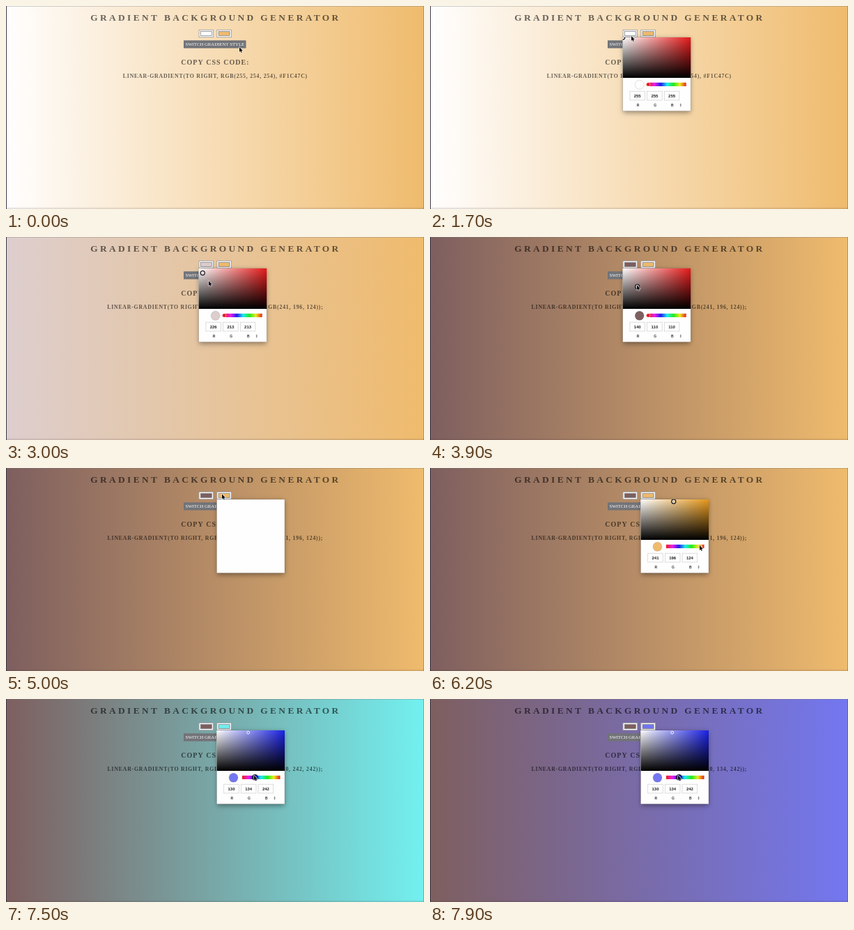
Write an HTML page with a canvas that moves like this. It is 600 px wide and 291 px high and loops after 8 s.

```html
<!DOCTYPE html>
<html lang="en">
<head>
<meta charset="utf-8">
<title>Gradient Background Generator</title>
<style>
  html, body { margin: 0; width: 100%; height: 100%; overflow: hidden; background: #fff; }
  canvas { display: block; width: 600px; height: 291px; }
</style>
</head>
<body>
<canvas id="stage" width="600" height="291"></canvas>
<script>
const ctx = document.getElementById('stage').getContext('2d');
const LOOP = 8000, STEP = 100;
const SERIF = '"Liberation Serif", "Times New Roman", serif';
const SANS = '"Liberation Sans", Arial, sans-serif';

// Each key: time, then values. Eased between keys.
const CURSOR = [
  [0, 335, 59], [500, 335, 59], [1300, 289, 43], [1800, 289, 43], [2200, 278, 46],
  [2500, 281, 50], [3000, 291, 63], [3500, 297, 69], [4000, 297, 69], [4700, 310, 37.5],
  [5300, 310, 37.5], [6100, 387, 111], [6500, 387, 111], [7000, 365, 111], [7300, 356, 109.5]
];
const SHADE = [
  [2300, 0, 1], [2700, 0.0575, 0.886], [3000, 0.0575, 0.886], [3600, 0.2143, 0.549]
];
const HUE = [[6300, 38], [6800, 52], [7000, 80.9], [7200, 160], [7500, 237.9]];

function track(keys, t) {
  if (t <= keys[0][0]) return keys[0].slice(1);
  for (let i = 1; i < keys.length; i++) {
    const a = keys[i - 1], b = keys[i];
    if (t < b[0]) {
      const p = (t - a[0]) / (b[0] - a[0]);
      const e = p * p * (3 - 2 * p);
      return a.slice(1).map((v, k) => v + (b[k + 1] - v) * e);
    }
  }
  return keys[keys.length - 1].slice(1);
}

function hsv(h, s, v) {
  const ch = n => {
    const k = (n + h / 60) % 6;
    return Math.round(255 * v * (1 - s * Math.max(0, Math.min(k, 4 - k, 1))));
  };
  return [ch(5), ch(3), ch(1)];
}

// Screen tone of a nominal colour
const tone = c => 'rgb(' + c.map(v => Math.round(255 * Math.pow(v / 255, 1.18))) + ')';
const css = c => 'RGB(' + c.join(', ') + ')';

function rect(x, y, w, h, fill) {
  ctx.fillStyle = fill;
  ctx.fillRect(x, y, w, h);
}

function frame(x, y, w, h, stroke, width) {
  ctx.strokeStyle = stroke;
  ctx.lineWidth = width;
  ctx.strokeRect(x, y, w, h);
}

function text(str, x, y, font, fill, gap = 0) {
  ctx.font = font;
  ctx.letterSpacing = gap + 'px';
  ctx.textAlign = 'center';
  ctx.fillStyle = fill;
  ctx.fillText(str, x, y);
  ctx.letterSpacing = '0px';
}

function dot(x, y, r, fill, stroke, width) {
  ctx.beginPath();
  ctx.arc(x, y, r, 0, 2 * Math.PI);
  if (fill) { ctx.fillStyle = fill; ctx.fill(); }
  if (stroke) { ctx.strokeStyle = stroke; ctx.lineWidth = width; ctx.stroke(); }
}

function blend(x0, y0, x1, y1, ...stops) {
  const g = ctx.createLinearGradient(x0, y0, x1, y1);
  stops.forEach((c, i) => g.addColorStop(i / (stops.length - 1), c));
  return g;
}

function colorInput(x, color) {
  rect(x, 34, 21, 11, '#fdfdfd');
  frame(x + 0.25, 34.25, 20.5, 10.5, '#85858a', 0.7);
  rect(x + 2.5, 36.5, 16, 6, color);
  frame(x + 2.5, 36.5, 16, 6, '#77777c', 0.7);
}

function picker(x, p) {
  const y = 45, w = 97.5, h = 58;
  ctx.save();
  ctx.shadowColor = 'rgba(0,0,0,.4)';
  ctx.shadowBlur = 7;
  ctx.shadowOffsetY = 2;
  rect(x, y, w, 105.5, '#fefefe');
  ctx.restore();
  frame(x, y, w, 105.5, 'rgba(90,80,75,.4)', 0.5);
  if (p.blank) return;

  rect(x, y, w, h, blend(x, 0, x + w, 0, '#fff', `hsl(${p.hue},80%,50%)`));
  rect(x, y, w, h, blend(0, y, 0, y + h, 'rgba(0,0,0,0)', '#000'));
  ctx.save();
  ctx.beginPath();
  ctx.rect(x, y, w, h);
  ctx.clip();
  const mx = x + p.s * w, my = y + (1 - p.v) * h;
  if (p.hueDrag) dot(mx, my, 2, null, '#fff', 0.9);
  else {
    dot(mx, my, 3, null, '#15151a', 1.3);
    dot(mx, my, 2, null, 'rgba(255,255,255,.75)', 0.7);
  }
  ctx.restore();

  const shown = tone(p.rgb);
  dot(x + 24, 112.8, 6.5, shown, 'rgba(120,110,110,.45)', 0.5);

  const bar = x + 36.5, len = 54.5;
  const wheel = [360, 300, 240, 180, 120, 60, 0].map(a => `hsl(${a},84%,52%)`);
  rect(bar, 109.8, len, 5.2, blend(bar, 0, bar + len, 0, ...wheel));
  const kx = bar + (p.hue ? 1 - p.hue / 360 : 0) * len;
  const knob = `hsl(${p.hue},80%,50%)`;
  if (p.hueDrag) dot(kx, 112.4, 3.8, knob, '#15151a', 1.4);
  else dot(kx, 112.4, 2.7, knob, '#fff', 0.5);

  p.rgb.forEach((v, i) => {
    const cx = x + 21 + i * 24.7;
    frame(cx - 10.8, 122.2, 21.6, 12.8, '#cfcfd2', 0.7);
    text(v, cx, 130.6, '600 6px ' + SANS, '#222');
    text('RGB'[i], cx + 0.8, 144, '600 5px ' + SANS, '#333');
  });
  ctx.fillStyle = '#444';
  for (const d of [-1, 1]) {
    ctx.beginPath();
    ctx.moveTo(x + 82, 142 + d * 0.6);
    ctx.lineTo(x + 84.2, 142 + d * 0.6);
    ctx.lineTo(x + 83.1, 142 + d * 2.2);
    ctx.fill();
  }
}

function cursor(x, y) {
  const shape = [[0, 0], [0, 7], [1.6, 5.6], [2.7, 8], [3.8, 7.5], [2.8, 5.2], [4.9, 5]];
  ctx.beginPath();
  shape.forEach(([dx, dy]) => ctx.lineTo(x + dx, y + dy));
  ctx.closePath();
  ctx.lineJoin = 'round';
  ctx.strokeStyle = 'rgba(255,255,255,.85)';
  ctx.lineWidth = 1.1;
  ctx.stroke();
  ctx.fillStyle = '#0c0c10';
  ctx.fill();
  ctx.lineJoin = 'miter';
}

const leftColor = t => hsv(0, ...track(SHADE, t));
const rightColor = t => t < 6400 ? [241, 196, 124] : hsv(track(HUE, t)[0], 0.463, 0.949);

function draw(t) {
  // The page follows the picker with a short delay.
  const lag = t - 200;
  const fresh = lag <= 2300;
  const left = fresh ? [255, 254, 254] : leftColor(lag);
  const right = rightColor(lag);
  const ink = 'rgba(0,0,0,.59)';

  rect(0, 0, 600, 291, blend(1, 0, 599, 0, tone(left), tone(right)));
  rect(0, 0, 600, 1, 'rgba(120,120,125,.35)');
  rect(0, 0, 1, 291, '#3a3848');
  rect(599, 0, 1, 291, 'rgba(50,48,70,.3)');
  rect(0, 288, 600, 3, blend(0, 288, 0, 291, 'rgba(60,40,40,0)', 'rgba(60,40,40,.18)'));

  text('GRADIENT BACKGROUND GENERATOR', 300.9, 21.3, 'bold 13.4px ' + SERIF, ink, 3.35);
  text('COPY CSS CODE:', 300.4, 84, 'bold 10.05px ' + SERIF, ink, 1);
  const code = fresh
    ? `LINEAR-GRADIENT(TO RIGHT, ${css(left)}, #F1C47C)`
    : `LINEAR-GRADIENT(TO RIGHT, ${css(left)}, ${css(right)});`;
  text(code, 300.4, 103.4, 'bold 7.8px ' + SERIF, ink, 0.78);

  colorInput(276.8, tone(left));
  colorInput(302.6, tone(right));
  rect(255, 49.3, 89.5, 11.2, '#727378');
  text('SWITCH GRADIENT STYLE', 299.8, 57.2, '6.75px ' + SERIF, '#fff');

  if (t >= 1500 && t < 4800) {
    const [s, v] = track(SHADE, t);
    picker(276.7, { blank: t < 1600, hue: 0, s, v, rgb: leftColor(t) });
  } else if (t >= 4900) {
    const drag = t >= 6400;
    picker(302.5, {
      blank: t < 5100,
      hue: drag ? track(HUE, t)[0] : 37,
      s: drag ? 0.463 : 0.485,
      v: 0.947,
      rgb: rightColor(t),
      hueDrag: drag
    });
  }
  cursor(...track(CURSOR, t));
}

function tick() {
  draw(Math.floor((performance.now() % LOOP) / STEP) * STEP);
  requestAnimationFrame(tick);
}
tick();
</script>
</body>
</html>
```
